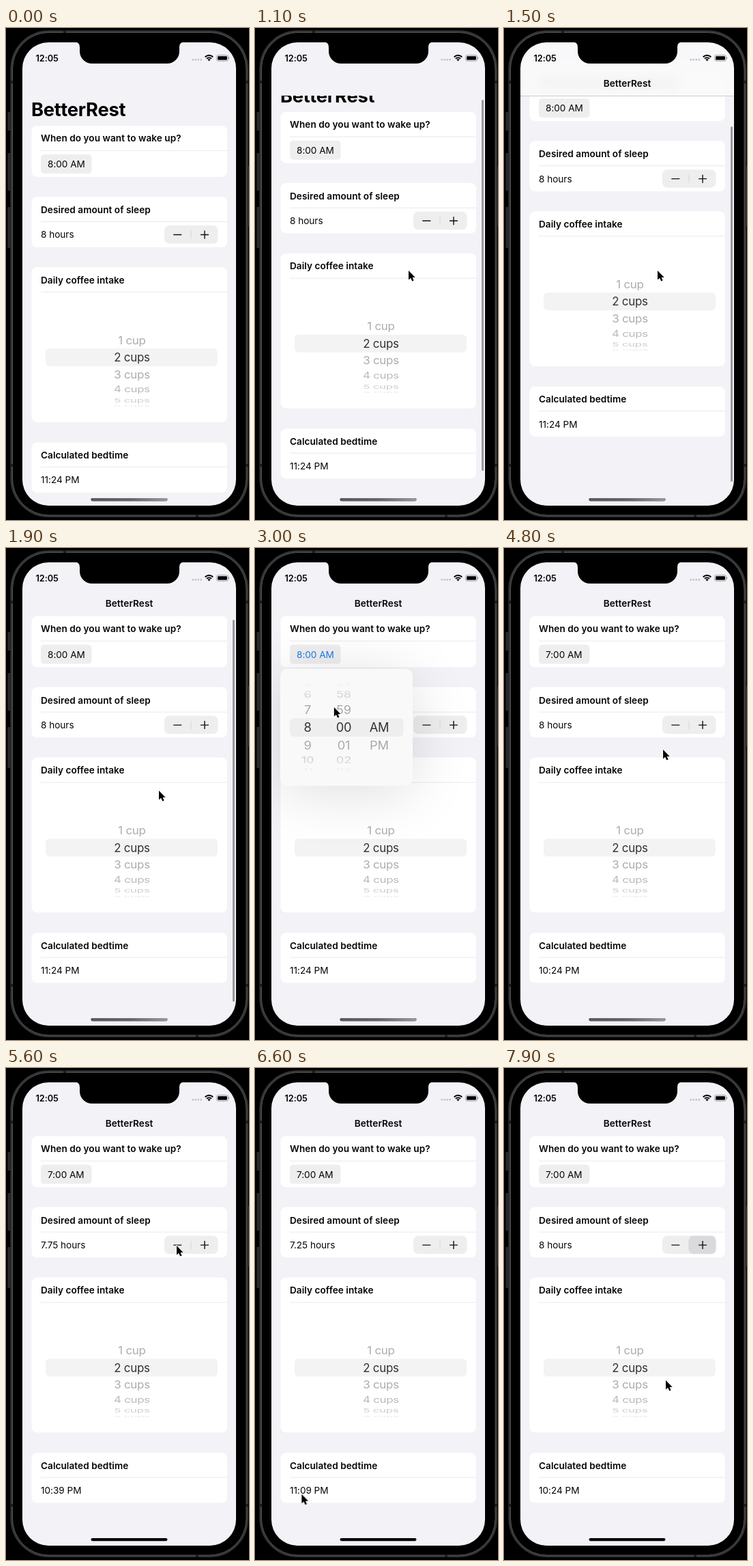
An HTML page for the animation above (8000 ms loop, 356 px wide and 720 px high).

```html
<!DOCTYPE html>
<html lang="en">
<head>
<meta charset="utf-8">
<title>BetterRest</title>
<style>
html, body { margin: 0; width: 100%; height: 100%; overflow: hidden; background: #000; }
#stage { position: relative; width: 356px; height: 720px; overflow: hidden; background: #f2f2f7; }
#stage > * { position: absolute; }
#stage * { animation-duration: 8s; animation-iteration-count: infinite; animation-timing-function: linear; }
svg { display: block; left: 0; top: 0; overflow: visible; }
text, #big { font-family: Inter, Roboto, sans-serif; font-size: 13.6px; letter-spacing: -.03px; fill: #050506; }
.b { font-weight: 600; letter-spacing: .05px; }
.mid { text-anchor: middle; }
.card { fill: #fff; }
.rule { fill: #e9e9eb; }
.chip { fill: #eeeeef; }
.on { fill: #dadade; opacity: 0; }
.wheel text { text-anchor: middle; font-size: 16.9px; letter-spacing: -.25px; fill: #333335; }
#time text { font-size: 18.3px; letter-spacing: -.2px; }

#bigBox { left: 24px; top: 99px; width: 313px; height: 60px; overflow: hidden; }
#big { position: absolute; left: 13px; top: 4px; font-size: 27.3px; line-height: 33px; font-weight: 700; letter-spacing: -.25px; color: #000; }
#list, #big { animation-name: scroll; }
@keyframes scroll {
  0%, 12.5% { transform: none; }
  13.75% { transform: translateY(-20px); }
  16.25% { transform: translateY(-82px); }
  17.5% { transform: translateY(-87px); }
  18.75% { transform: translateY(-82px); }
  21.25% { transform: translateY(-52px); }
  23.5%, 100% { transform: translateY(-43.4px); }
}
#glass { left: 24px; top: 21px; width: 313px; height: 78px; border-bottom: 1px solid #cbcbce;
  background: rgba(250, 250, 251, .86); backdrop-filter: blur(9px); animation-name: glass; }
@keyframes glass { 0%, 15% { opacity: 0; } 16%, 21.3% { opacity: 1; } 23%, 100% { opacity: 0; } }
#small { animation-name: small; }
@keyframes small { 0%, 14% { opacity: 0; } 15.2%, 100% { opacity: 1; } }

#bar { left: 332px; width: 3px; top: 105px; bottom: 56px; border-radius: 2px; background: #98989c; animation-name: bar; }
@keyframes bar {
  0%, 12.5% { opacity: 0; top: 105px; bottom: 88px; }
  13.75% { opacity: 1; top: 105px; bottom: 72px; }
  15% { top: 105px; bottom: 56px; }
  16.25% { top: 144px; }
  17.5% { top: 149px; }
  18.75% { top: 144px; }
  21.25% { top: 114px; }
  23.5% { top: 105px; }
  28.5% { opacity: 1; }
  32%, 100% { opacity: 0; top: 105px; bottom: 56px; }
}

#pop { left: 37px; top: 177px; width: 194px; height: 171px; border-radius: 10px; background: #f9f9f9;
  box-shadow: 0 10px 84px rgba(0, 0, 0, .13); transform-origin: 50px 0; animation-name: pop; }
#pop svg { mask-image: linear-gradient(transparent 8%, #000 32%, #000 68%, transparent 92%); }
@keyframes pop {
  0%, 34% { opacity: 0; transform: scale(.2); }
  36.2% { opacity: 1; transform: scale(.97); }
  37.2%, 57% { opacity: 1; transform: none; }
  59.5% { opacity: 0; transform: scale(.75); }
  100% { opacity: 0; transform: scale(.2); }
}
#wake { animation-name: wake; }
@keyframes wake { 0%, 33% { fill: #050506; } 34.5%, 57% { fill: #1a7ae8; } 59%, 100% { fill: #050506; } }
#stage .on { animation-timing-function: steps(1, end); }
#minus { animation-name: minus; }
@keyframes minus {
  0% { opacity: 0; }
  68.1% { opacity: 1; } 69.5% { opacity: 0; }
  73.1% { opacity: 1; } 74.5% { opacity: 0; }
  77% { opacity: 1; } 78.5%, 100% { opacity: 0; }
}
#plus { animation-name: plus; }
@keyframes plus {
  0% { opacity: 0; }
  91% { opacity: 1; } 92.3% { opacity: 0; }
  94.7% { opacity: 1; } 96% { opacity: 0; }
  98.3%, 100% { opacity: 1; }
}
#dim { animation-name: dim; }
@keyframes dim { 0%, 65% { opacity: 1; } 70%, 100% { opacity: 0; } }

#mouse { animation-name: mouse; }
@keyframes mouse {
  0% { opacity: 0; transform: translate(160px, 35px); }
  1.2% { opacity: 0; }
  1.25% { opacity: 1; transform: translate(160px, 36px); }
  3% { transform: translate(130px, 190px); }
  5% { transform: translate(95px, 400px); }
  7.5% { transform: translate(56px, 661px); }
  9% { transform: translate(110px, 560px); }
  11.5%, 18.75% { transform: translate(225px, 355px); }
  23.75%, 25% { transform: translate(224px, 355px); }
  28% { transform: translate(150px, 230px); }
  31%, 34.5% { transform: translate(92px, 158px); }
  37.5% { transform: translate(116px, 233px); }
  39.5% { transform: translate(78px, 238px); }
  44%, 50% { transform: translate(78px, 264px); }
  54.5%, 57.5% { transform: translate(257px, 300px); }
  60% { transform: translate(233px, 295px); }
  62% { transform: translate(236px, 290px); }
  66%, 78.6% { transform: translate(250px, 260px); }
  80.5% { transform: translate(170px, 440px); }
  82.5% { transform: translate(68.5px, 623.5px); }
  84% { transform: translate(48px, 646px); }
  86% { transform: translate(170px, 500px); }
  87.5% { transform: translate(322px, 300px); }
  88.7% { transform: translate(345px, 268px); }
  90.3%, 97.5% { transform: translate(291px, 256px); }
  98.75%, 100% { opacity: 1; transform: translate(237px, 457px); }
}
</style>
</head>
<body>
<div id="stage">
  <svg width="356" height="720">
    <g id="list">
      <rect class="card" x="37.5" y="143" width="286.5" height="75" rx="8"/>
      <text class="b" x="51" y="166.4">When do you want to wake up?</text>
      <rect class="rule" x="51" y="179" width="273" height="1"/>
      <rect class="chip" x="51" y="185" width="74.5" height="28" rx="5"/>
      <text id="wake" x="61" y="204">8:00 AM</text>

      <rect class="card" x="37.5" y="247" width="286.5" height="74" rx="8"/>
      <text class="b" x="51" y="271">Desired amount of sleep</text>
      <rect class="rule" x="51" y="283" width="273" height="1"/>
      <text id="hours" x="51" y="307.4">8 hours</text>
      <rect class="chip" x="232" y="289" width="78.5" height="26.5" rx="7"/>
      <rect id="minus" class="on" x="232" y="289" width="39" height="26.5" rx="7"/>
      <rect id="plus" class="on" x="270.5" y="289" width="40" height="26.5" rx="7"/>
      <path d="M271 296.5v12" stroke="#d4d4d7"/>
      <path d="M245.3 302.5h12M285 302.5h12M291 296.5v12" stroke="#111" stroke-width="1.4"/>

      <rect class="card" x="37.5" y="350" width="286.5" height="227" rx="8"/>
      <text class="b" x="51" y="373.5">Daily coffee intake</text>
      <rect class="rule" x="51" y="386" width="273" height="1"/>
      <rect x="58" y="469" width="252" height="26" rx="6" fill="#f3f3f4"/>
      <g id="cups" class="wheel"></g>

      <rect class="card" x="37.5" y="606.5" width="286.5" height="73.5" rx="8"/>
      <text class="b" x="51" y="630">Calculated bedtime</text>
      <rect class="rule" x="51" y="642" width="273" height="1"/>
      <text id="bed" x="51" y="666.4">11:24 PM</text>
    </g>
  </svg>
  <div id="bigBox"><div id="big">BetterRest</div></div>
  <div id="glass"></div>
  <div id="bar"></div>
  <div id="pop">
    <svg width="194" height="171" viewBox="37 177 194 171">
      <rect x="51" y="249" width="166.5" height="27" rx="6" fill="#eeeeef"/>
      <g id="time" class="wheel"></g>
    </svg>
  </div>
  <svg width="356" height="720">
    <linearGradient id="shade"><stop stop-color="#5a5a5d"/><stop offset=".5" stop-color="#666669"/><stop offset="1" stop-color="#98989c"/></linearGradient>
    <text id="small" class="b mid" x="180.5" y="86.2">BetterRest</text>
    <rect x="124.5" y="688" width="112" height="4.2" rx="2.1"/>
    <rect id="dim" x="124.5" y="688" width="112" height="4.2" rx="2.1" fill="url(#shade)"/>

    <path fill="#000" fill-rule="evenodd" d="M0 0H356V720H0ZM62 21H299A38 38 0 0 1 337 59V661A38 38 0 0 1 299 699H62A38 38 0 0 1 24 661V59A38 38 0 0 1 62 21Z"/>
    <path d="M100 20H262C255 21 254 24 254 29V34A18 18 0 0 1 236 52H126A18 18 0 0 1 108 34V29C108 24 107 21 100 20Z"/>
    <g fill="none">
      <rect x="8" y="5" width="345.5" height="709.5" rx="55" stroke="#343436" stroke-width="3"/>
      <rect x="9.5" y="6.5" width="342.5" height="706.5" rx="53.5" stroke="#606063" stroke-width=".9"/>
      <path d="M6.5 79h4M351 79h4M6.5 640h4M351 640h4M86 3.5v4M280 712v4" stroke="#1c1c1e" stroke-width="4"/>
    </g>
    <path d="M2.5 123h4v27h-4zM2.5 183h4v55h-4zM2.5 262h4v60h-4zM354.5 202h1.5v88h-1.5z" fill="#29292b"/>

    <text class="b" x="43.5" y="48.6" style="font-size:12.8px;letter-spacing:-.1px">12:05</text>
    <path d="M273.7 46.4h0m4 0h0m4 0h0m4 0h0" stroke="#c2c2c6" stroke-width="2.8" stroke-linecap="round"/>
    <g fill="none" stroke="#000" stroke-width="1.9">
      <path d="M291.7 42.5a8 8 0 0 1 11.6 0M293.9 44.9a5 5 0 0 1 7.2 0"/>
      <path d="M295.4 46.3L297.5 48.6L299.6 46.3A3 3 0 0 0 295.4 46.3Z" fill="#000" stroke="none"/>
    </g>
    <rect x="308.5" y="39.7" width="17" height="8.6" rx="2.6" fill="none" stroke="#98989b" stroke-width=".9"/>
    <rect x="310" y="41.2" width="14" height="5.6" rx="1.4"/>
    <path d="M326.6 42.6v2.8" stroke="#98989b"/>

    <g id="mouse">
      <path d="M0 0V13.6L3.1 10.8L5.2 15.6L7.6 14.6L5.6 9.9H9.7Z" stroke="#fff" stroke-width="1.8" stroke-linejoin="round" paint-order="stroke"/>
    </g>
  </svg>
</div>
<script>
const LOOP = 8000;
const $ = id => document.getElementById(id);
const range = (from, n, label) => Array.from({ length: n }, (_, i) => label(from + i));
const pad = n => String((n + 60) % 60).padStart(2, '0');

// Labels on a cylinder; the returned function turns it to a row index.
function wheel(id, x, y, radius, step, labels) {
  const rows = labels.map(label => {
    const el = document.createElementNS('http://www.w3.org/2000/svg', 'text');
    el.textContent = label;
    el.setAttribute('dy', '.36em');
    return $(id).appendChild(el);
  });
  return pos => rows.forEach((el, i) => {
    const far = Math.abs(i - pos);
    const a = (i - pos) * step * Math.PI / 180;
    const facing = Math.cos(a);
    const shown = far * step < 86;
    el.setAttribute('transform', `translate(${x} ${y + radius * Math.sin(a)}) scale(1 ${Math.max(facing, .01)})`);
    el.setAttribute('opacity', shown ? Math.max(1 - far, 0) * .57 + .06 + .37 * facing : 0);
  });
}

wheel('cups', 184.5, 482, 72, 20.3, range(1, 6, n => n + (n > 1 ? ' cups' : ' cup')))(1);
const turnHour = wheel('time', 77, 262.5, 67, 22.8, range(3, 9, String));
wheel('time', 130, 262.5, 67, 22.8, range(-4, 9, pad))(4);
wheel('time', 182, 262.5, 67, 22.8, ['AM', 'PM'])(0);

// Each step: time, wake-up, hours of sleep, bedtime.
const steps = [
  [0, '8:00', '8', '11:24'],
  [3790, '7:00', '8', '10:24'],
  [5490, '7:00', '7.75', '10:39'],
  [5890, '7:00', '7.5', '10:54'],
  [6190, '7:00', '7.25', '11:09'],
  [7310, '7:00', '7.5', '10:54'],
  [7590, '7:00', '7.75', '10:39'],
  [7880, '7:00', '8', '10:24']
];

function draw(t) {
  const [, wake, hours, bed] = steps.filter(s => s[0] <= t).pop();
  $('wake').textContent = wake + ' AM';
  $('hours').textContent = hours + ' hours';
  $('bed').textContent = bed + ' PM';
  const k = Math.min(Math.max((t - 3160) / 440, 0), 1);
  turnHour(5 - k * k * (3 - 2 * k));
}

let start;
function tick(now) {
  start ??= now;
  draw((now - start) % LOOP);
  requestAnimationFrame(tick);
}
draw(0);
requestAnimationFrame(tick);
</script>
</body>
</html>
```
